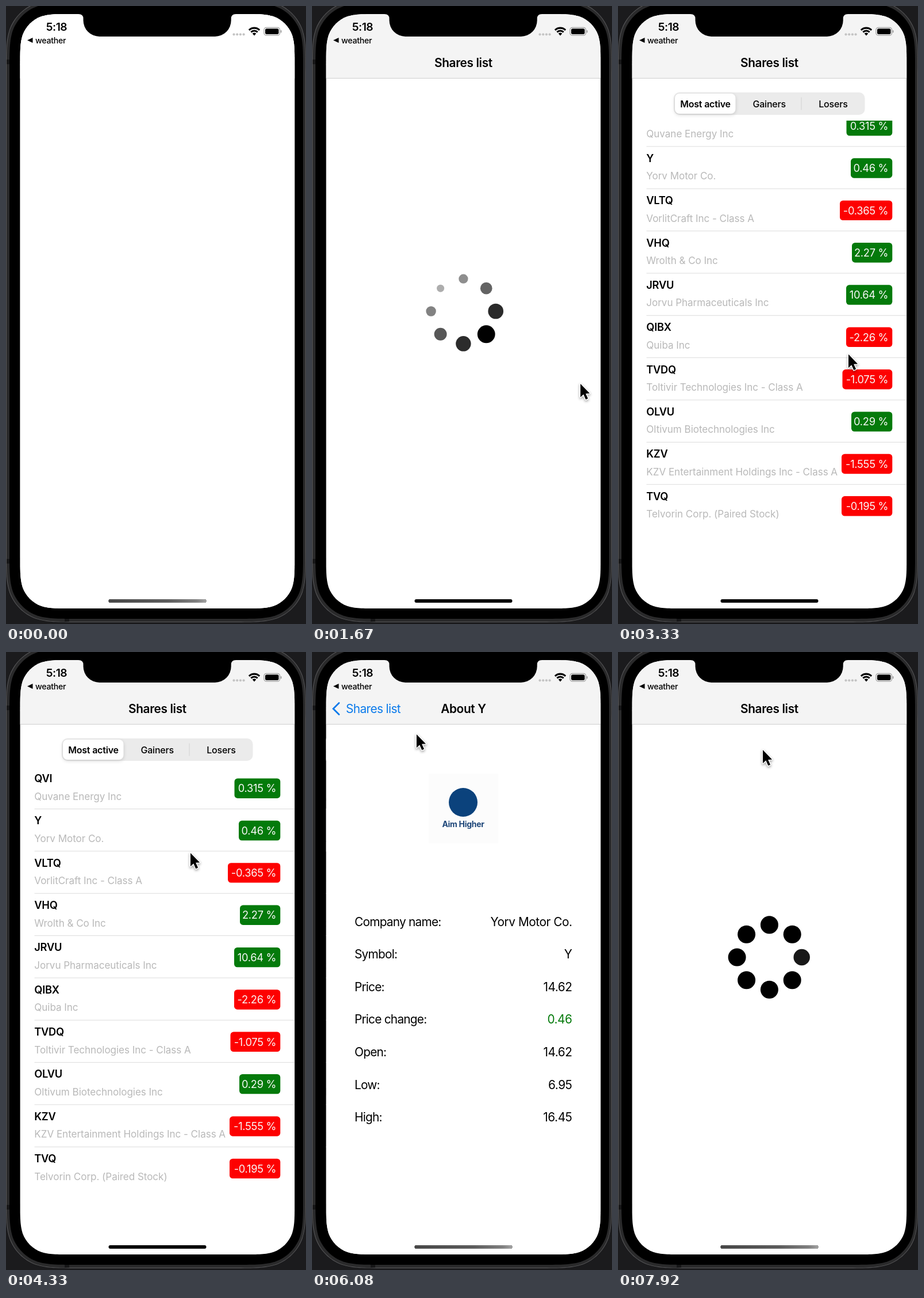
An HTML page with a canvas that plays this animation: 522 by 1073 pixels, repeating every 8 s.

```html
<!DOCTYPE html>
<html lang="en">
<head>
<meta charset="utf-8">
<title>Shares list</title>
<style>
html, body { margin: 0; width: 522px; height: 1073px; overflow: hidden; background: #1b1b1d; }
canvas { display: block; }
</style>
</head>
<body>
<canvas id="stage" width="522" height="1073"></canvas>
<script>
const ctx = document.getElementById('stage').getContext('2d');
const LOOP = 8000, STEP = 1000 / 12;
const SCREEN = { x: 24.6, y: 14, w: 477.6, h: 1032 };
const MID = 263.4, BLUE = '#0a7aeb', GREEN = '#047a0b', RED = '#fd0101';
const ROW_H = 73.35, LIST_TOP = 199.2;

// Moments of the story, in ms
const LAUNCHED = 620, SPIN_1 = 550, LOADED = 1950, SELECT = 4490, PUSH = 4580,
      POP = 6480, DESELECT = 7000, SEGMENT = 7600, SPIN_2 = 7850;

// symbol, company, change, left edge of the badge
const ROWS = [
  ['QVI', 'Quvane Energy Inc', '0.315', 397.5],
  ['Y', 'Yorv Motor Co.', '0.46', 405],
  ['VLTQ', 'VorlitCraft Inc - Class A', '-0.365', 386],
  ['VHQ', 'Wrolth & Co Inc', '2.27', 407],
  ['JRVU', 'Jorvu Pharmaceuticals Inc', '10.64', 397],
  ['QIBX', 'Quiba Inc', '-2.26', 397],
  ['TVDQ', 'Toltivir Technologies Inc - Class A', '-1.075', 390.5],
  ['OLVU', 'Oltivum Biotechnologies Inc', '0.29', 406],
  ['KZV', 'KZV Entertainment Holdings Inc - Class A', '-1.555', 389],
  ['TVQ', 'Telvorin Corp. (Paired Stock)', '-0.195', 389]
];
const DETAILS = [
  ['Company name:', 'Yorv Motor Co.'], ['Symbol:', 'Y'], ['Price:', '14.62'],
  ['Price change:', '0.46'], ['Open:', '14.62'], ['Low:', '6.95'], ['High:', '16.45']
];

// time, x, y of the pointer tip
const POINTER = [
  [1500, 500, 640], [1667, 467, 656], [2000, 462, 500], [2333, 455, 222],
  [2750, 440, 865], [3083, 393, 668], [3333, 401, 605], [3500, 400, 540],
  [3750, 370, 440], [4333, 321, 349], [4490, 316, 320], [5100, 300, 300],
  [5583, 206, 224], [5666, 148, 95], [5833, 148, 95], [6083, 182, 143],
  [6400, 129, 95], [7083, 129, 95], [7583, 252, 170], [8000, 252, 170]
];
// time, upward shift of the rows
const SCROLL = [
  [3083, 0], [3167, 9], [3333, 28.5], [3500, 50], [3583, 36], [3667, 20],
  [3750, 9], [3833, 3], [3917, 0]
];

const clamp = v => Math.max(0, Math.min(1, v));
const ramp = (t, start, length) => clamp((t - start) / length);
const ease = v => v * v * (3 - 2 * v);

function track(keys, t) {
  if (t <= keys[0][0]) return keys[0].slice(1);
  for (let i = 1; i < keys.length; i++) {
    const a = keys[i - 1], b = keys[i];
    if (t <= b[0]) {
      const k = (t - a[0]) / (b[0] - a[0]);
      return a.slice(1).map((v, j) => v + (b[j + 1] - v) * k);
    }
  }
  return keys[keys.length - 1].slice(1);
}

function spring(ms) {
  const s = 12.6 * Math.max(0, ms) / 1000;
  return 1 - (1 + s) * Math.exp(-s);
}

const pushed = t => t < POP ? spring(t - PUSH) : 1 - spring(t - POP);

function text(str, x, y, size, weight, color, align = 'left', spacing = 0) {
  ctx.font = `${weight} ${size}px Inter, sans-serif`;
  ctx.letterSpacing = spacing + 'px';
  ctx.textAlign = align;
  ctx.fillStyle = color;
  ctx.fillText(str, x, y);
}

function box(x, y, w, h, r, color) {
  ctx.fillStyle = color;
  ctx.beginPath();
  ctx.roundRect(x, y, w, h, r);
  ctx.fill();
}

function disc(x, y, r, color) {
  ctx.fillStyle = color;
  ctx.beginPath();
  ctx.arc(x, y, r, 0, Math.PI * 2);
  ctx.fill();
}

function poly(points, color) {
  ctx.fillStyle = color;
  ctx.beginPath();
  points.forEach(([x, y]) => ctx.lineTo(x, y));
  ctx.closePath();
  ctx.fill();
}

function layer(draw, alpha = 1) {
  ctx.save();
  ctx.globalAlpha = alpha;
  draw();
  ctx.restore();
}

// Rectangle whose corners bend gradually, as on the phone's hardware
function smoothRect(x, y, w, h, r) {
  ctx.beginPath();
  [[x + w, y], [x + w, y + h], [x, y + h], [x, y]].forEach(([cx, cy], i) => layer(() => {
    ctx.translate(cx, cy);
    ctx.rotate(i * Math.PI / 2);
    ctx.scale(r, r);
    ctx.lineTo(-1.529, 0);
    ctx.bezierCurveTo(-1.088, 0, -0.868, 0, -0.631, 0.075);
    ctx.bezierCurveTo(-0.373, 0.169, -0.169, 0.373, -0.075, 0.631);
    ctx.bezierCurveTo(0, 0.868, 0, 1.088, 0, 1.529);
  }));
  ctx.closePath();
}

function fillSmooth(x, y, w, h, r, color) {
  smoothRect(x, y, w, h, r);
  ctx.fillStyle = color;
  ctx.fill();
}

function drawBody() {
  ctx.fillStyle = '#1b1b1d';
  ctx.fillRect(0, 0, 522, 1073);
  fillSmooth(0, -11, 522, 1081, 82, '#5a5a5c');
  fillSmooth(1, -10, 520, 1079, 81, '#2a2a2b');
  ctx.fillStyle = '#171718';
  ctx.fillRect(1, 93, 5, 8);
  ctx.fillRect(1, 960, 5, 8);
  ctx.fillRect(102, 1063, 8, 6);
  fillSmooth(6, -5, 511, 1069, 76, '#000');
}

function drawNotch() {
  ctx.fillStyle = '#000';
  ctx.beginPath();
  ctx.moveTo(126, 13);
  ctx.lineTo(126, 14);
  ctx.quadraticCurveTo(134.5, 14, 134.5, 22);
  ctx.arcTo(134.5, 53, 165, 53, 28);
  ctx.lineTo(363, 53);
  ctx.arcTo(391.7, 53, 391.7, 22, 28);
  ctx.lineTo(391.7, 22);
  ctx.quadraticCurveTo(391.7, 14, 400, 14);
  ctx.lineTo(400, 13);
  ctx.fill();
}

function drawStatus() {
  text('5:18', 88, 43, 19.2, 600, '#000', 'center', -0.5);
  poly([[37, 59.5], [46.5, 55], [46.5, 64]], '#000');
  text('weather', 51, 64.5, 14.2, 500, '#000', 'left', -0.3);
  for (let i = 0; i < 4; i++) disc(396.5 + i * 5.7, 49.3, 2.1, '#c4c4c4');

  ctx.strokeStyle = '#000';
  ctx.lineWidth = 3.1;
  for (const r of [12.9, 8]) {
    ctx.beginPath();
    ctx.arc(432, 51, r, -Math.PI * 0.75, -Math.PI * 0.25);
    ctx.stroke();
  }
  ctx.fillStyle = '#000';
  ctx.beginPath();
  ctx.moveTo(432, 51.5);
  ctx.arc(432, 51, 4.6, -Math.PI * 0.75, -Math.PI * 0.25);
  ctx.fill();

  ctx.strokeStyle = '#9a9a9a';
  ctx.lineWidth = 1.2;
  ctx.beginPath();
  ctx.roundRect(449, 37.3, 27.5, 13.6, 4);
  ctx.stroke();
  box(451, 39.3, 23.5, 9.6, 2.5, '#000');
  box(477.8, 42, 1.7, 4.4, 1, '#9a9a9a');
}

function drawHomeBar(t) {
  box(178.5, 1030, 170, 6, 3, '#000');
  const gray = t < PUSH ? 1 - ramp(t, LAUNCHED, 180) : ramp(t, PUSH, 200);
  const shade = ctx.createLinearGradient(178, 0, 349, 0);
  shade.addColorStop(0, '#474747');
  shade.addColorStop(0.6, '#5c5c5c');
  shade.addColorStop(0.9, '#808080');
  shade.addColorStop(1, '#a4a4a4');
  layer(() => box(178.5, 1030, 170, 6, 3, shade), gray);
}

function drawNav(q) {
  ctx.fillStyle = '#f4f4f4';
  ctx.fillRect(24, 14, 479, 111);
  ctx.fillStyle = '#cfcfcf';
  ctx.fillRect(24, 125, 479, 1);
  const title = (str, x, alpha) =>
    layer(() => text(str, x, 106, 20.8, 600, '#000', 'center', -0.35), alpha);
  title('Shares list', MID - 110 * q, 1 - q);
  title('About Y', MID + 200 * (1 - q), q);
  layer(() => {
    ctx.strokeStyle = BLUE;
    ctx.lineWidth = 2.8;
    ctx.lineCap = 'round';
    ctx.beginPath();
    ctx.moveTo(47, 88.5);
    ctx.lineTo(37, 98.5);
    ctx.lineTo(47, 108.5);
    ctx.stroke();
    text('Shares list', 59 + 140 * (1 - q), 106, 20.8, 400, BLUE, 'left', -0.6);
  }, q);
}

function drawSegments(pos) {
  box(97, 150, 332.5, 39, 10, '#ebebeb');
  layer(() => {
    ctx.fillStyle = '#d2d2d2';
    ctx.fillRect(318.5, 158.5, 1, 22);
  }, 1 - pos);
  layer(() => {
    ctx.shadowColor = 'rgba(0,0,0,.16)';
    ctx.shadowBlur = 6;
    ctx.shadowOffsetY = 2;
    box(99 + 111 * pos, 152, 105.5, 35, 8, '#fff');
  });
  ['Most active', 'Gainers', 'Losers'].forEach((label, i) =>
    text(label, 152 + 111.2 * i, 175.5, 16, i === Math.round(pos) ? 600 : 500, '#000', 'center', -0.2));
}

function drawRow([symbol, company, change, left], i, y, glow) {
  if (i === 1 && glow > 0) {
    layer(() => {
      ctx.fillStyle = '#cccbd1';
      ctx.fillRect(24, y, 478, ROW_H);
    }, glow);
  }
  text(symbol, 49.3, y + 26.8, 18.3, 600, '#000', 'left', -0.3);
  text(company, 49.3, y + 57.3, 17.1, 400, 'rgba(0,0,0,.28)', 'left', -0.06);
  box(left, y + 20.3, 477.3 - left, 34.4, 5.5, change < 0 ? RED : GREEN);
  text(change + ' %', 470.2, y + 44.2, 18.3, 400, '#f8f8f8', 'right', -0.3);
  if (i < ROWS.length - 1) {
    ctx.fillStyle = '#dcdcdc';
    ctx.fillRect(49.5, y + ROW_H - 0.6, 453, 1);
  }
}

function drawList(t) {
  const [lift] = track(SCROLL, t);
  const glow = t < SELECT ? 0 : 1 - ramp(t, DESELECT, 300);
  drawSegments(ease(ramp(t, SEGMENT, 200)));
  ctx.beginPath();
  ctx.rect(24, 199, 479, 848);
  ctx.clip();
  ROWS.forEach((row, i) => drawRow(row, i, LIST_TOP + i * ROW_H - lift, glow));
}

function drawDetail() {
  ctx.fillStyle = '#fff';
  ctx.fillRect(24.5, 126, 478, 921);
  ctx.fillStyle = '#fcfcfc';
  ctx.fillRect(203, 211, 121, 121);
  disc(263, 261, 25, '#0b427c');
  text('Aim Higher', 263, 303.5, 14, 700, '#1d4679', 'center', -0.3);
  DETAILS.forEach(([label, value], i) => {
    const y = 475.5 + i * 56.65;
    text(label, 74, y, 20.8, 400, '#000', 'left', -0.75);
    text(value, 452.5, y, 20.8, 400, i === 3 ? GREEN : '#000', 'right', -0.45);
  });
}

function drawSpinner(ms) {
  for (let i = 0; i < 8; i++) {
    const phase = Math.max(0, ms / 1000 - 0.12 * i) % 1;
    const fade = 1 - Math.abs(2 * phase - 1);
    const angle = i * Math.PI / 4;
    layer(() => disc(MID + 56.3 * Math.cos(angle), 530 + 56.3 * Math.sin(angle),
      15.5 * (1 - 0.6 * fade), '#000'), 1 - 0.7 * fade);
  }
}

function drawContent(t, q) {
  if (t < LOADED) return drawSpinner(t - SPIN_1);
  if (t >= SPIN_2) return drawSpinner(t - SPIN_2);
  layer(() => {
    ctx.translate(-0.3 * SCREEN.w * q, 0);
    drawList(t);
  });
  if (q < 0.001) return;
  ctx.fillStyle = `rgba(0,0,0,${0.1 * q})`;
  ctx.fillRect(24, 126, 479, 921);
  layer(() => {
    ctx.translate(SCREEN.w * (1 - q), 0);
    drawDetail();
  });
}

function drawPointer(t) {
  if (t < POINTER[0][0] - 1) return;
  const [x, y] = track(POINTER, t);
  layer(() => {
    ctx.translate(x, y);
    ctx.scale(0.95, 0.95);
    ctx.beginPath();
    [[0, 0], [0, 24.5], [5.6, 19.3], [9.8, 28.8], [13.8, 27], [9.6, 17.8], [17, 17.5]]
      .forEach(([px, py]) => ctx.lineTo(px, py));
    ctx.closePath();
    ctx.lineJoin = 'round';
    ctx.lineWidth = 3;
    ctx.strokeStyle = '#fff';
    ctx.shadowColor = 'rgba(0,0,0,.4)';
    ctx.shadowBlur = 4;
    ctx.shadowOffsetY = 2;
    ctx.stroke();
    ctx.shadowColor = 'transparent';
    ctx.fillStyle = '#000';
    ctx.fill();
  });
}

function render(t) {
  const q = pushed(t);
  const { x, y, w, h } = SCREEN;
  drawBody();
  layer(() => {
    smoothRect(x, y, w, h, 58);
    ctx.clip();
    ctx.fillStyle = '#fff';
    ctx.fillRect(x - 1, y, w + 2, h + 1);
    drawContent(t, q);
    drawNav(q);
    layer(() => {
      ctx.fillStyle = '#fff';
      ctx.fillRect(x - 1, y, w + 2, h + 1);
    }, 1 - ramp(t, LAUNCHED, 180));
    drawStatus();
    drawHomeBar(t);
  });
  drawNotch();
  drawPointer(t);
}

function tick() {
  const t = performance.now() % LOOP;
  render(Math.floor(t / STEP + 0.05) * STEP);
  requestAnimationFrame(tick);
}
tick();
</script>
</body>
</html>
```
